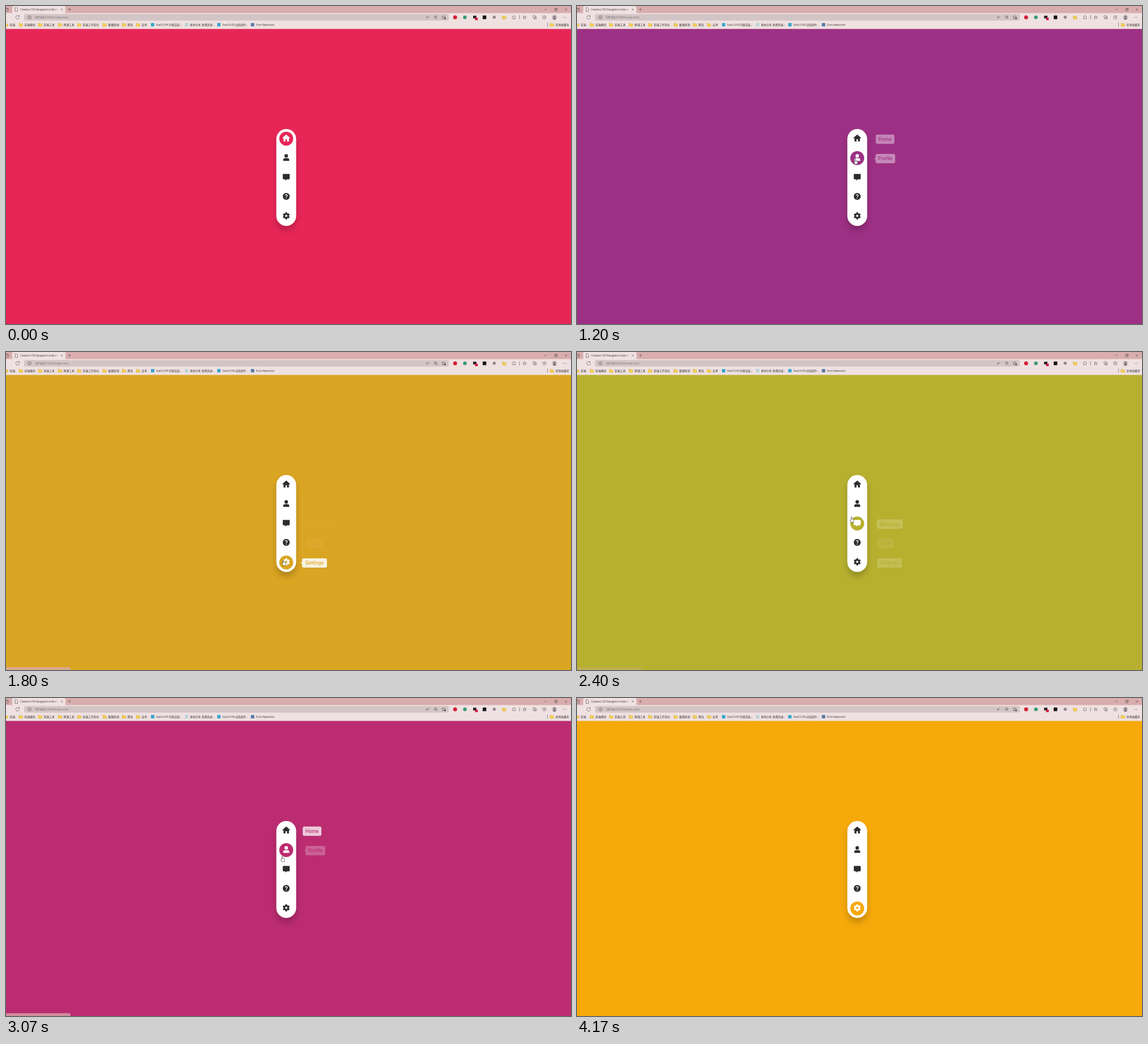
Animation, 998 px wide and 561 px high, one loop 4930 ms. Source, as an HTML page:

```html
<!DOCTYPE html>
<html lang="en">
<head>
<meta charset="utf-8">
<title>Navigation indicator</title>
<style>
  html, body { margin: 0; width: 100%; height: 100%; overflow: hidden; }
  svg { display: block; width: 100vw; height: 100vh; }
  .ui { font-family: "Open Sans", "Noto Sans CJK SC", "Noto Sans CJK", sans-serif; fill: #3b3435; }
  .tip { font: 500 8.3px Inter, sans-serif; text-anchor: middle; }
  .line { fill: none; stroke: #4b4344; stroke-width: .6; }
</style>
</head>
<body>
<svg id="stage" viewBox="0 0 998 561" preserveAspectRatio="none">
  <defs>
    <filter id="soft" x="-100%" y="-30%" width="300%" height="160%"><feGaussianBlur stdDeviation="6"/></filter>
    <linearGradient id="tabFade"><stop offset="0" stop-color="#efe1e1" stop-opacity="0"/><stop offset="1" stop-color="#efe1e1"/></linearGradient>
  </defs>
  <rect width="998" height="561" fill="currentColor"/>
  <g id="browser" class="ui"></g>
  <rect x="478" y="225" width="34" height="171" rx="17" opacity=".2" filter="url(#soft)"/>
  <rect x="477.5" y="217" width="35" height="171" rx="17.5" fill="#fff"/>
  <circle id="dot" cx="495" r="12.3" fill="currentColor"/>
  <g id="icons"></g>
  <g id="tips"></g>
  <path id="status" d="M0 556H112Q114 556 114 558V561H0Z" fill="#d9adad"/>
  <g id="cursor" fill="#fff" stroke="#222" stroke-width=".6" stroke-linejoin="round">
    <path id="arrow" d="M0 0V9L2.2 7L3.7 10.2L5 9.6L3.6 6.5H6.4Z"/>
    <path id="hand" d="M-1.9 1V-4.2Q-1.2-5.4-.5-4.2V-1.2L2.5-.6Q3.3-.3 3.2 .6L2.6 4.8H-1.7L-3.7 1.6Q-3.4 .3-1.9 1Z"/>
  </g>
</svg>
<script>
const LOOP = 4930, FADE = 500;
const byId = id => document.getElementById(id);
const lerp = (a, b, k) => a + (b - a) * k;
const rowY = i => 234 + i * 34.3;

const gear = () => {
  let teeth = "";
  for (let a = 0; a < 360; a += 60)
    teeth += `<rect x="-1.7" y="-6.2" width="3.4" height="5" rx=".7" transform="rotate(${a})"/>`;
  return `${teeth}<circle r="4.6"/><circle r="1.9" class="hole"/>`;
};

const items = [
  { name: "Home", width: 33, color: [231, 38, 87], icon:
    '<path d="M0-6.3L6.7-.4L5.8 .7L4.8 0V5.3Q4.8 6 4.1 6H1.3V2H-1.3V6H-4.1Q-4.8 6-4.8 5.3V0L-5.8 .7L-6.7-.4Z"/>' },
  { name: "Profile", width: 34.5, color: [60, 60, 190], icon:
    '<circle cy="-2.9" r="3.1"/><path d="M-5.3 6V4.2Q-5.3 1.2-2.3 1.2H2.3Q5.3 1.2 5.3 4.2V6Z"/>' },
  { name: "Message", width: 45.5, color: [5, 196, 107], icon:
    '<path d="M-5-5.4H5Q6.1-5.4 6.1-4.3V3Q6.1 4.1 5 4.1H1.2L-1.6 6.4V4.1H-5Q-6.1 4.1-6.1 3V-4.3Q-6.1-5.4-5-5.4Z"/>' },
  { name: "Help", width: 28, color: [15, 188, 249], icon:
    '<circle r="6.1"/><path class="mark" d="M-1.8-1.5Q-1.7-3.2 0-3.2Q1.8-3.2 1.8-1.6Q1.8-.6 .6 0Q0 .4 0 1.2" fill="none" stroke-width="1.2"/><circle class="hole" cy="3" r=".8"/>' },
  { name: "Settings", width: 44, color: [246, 169, 11], icon: gear() }
];

// [time, hovered row]; -1 means the pointer left the bar
const hovers = [
  [855, 0], [1070, 1], [1270, 2], [1410, 3], [1520, 4], [2140, -1],
  [2275, 3], [2325, 2], [2430, 1], [2495, 0], [2980, 1],
  [3112, 2], [3228, 3], [3402, 4], [3640, -1]
];

const pointerPath = [
  [250, 640, 490], [570, 562, 365], [870, 509, 244], [950, 497, 236], [1070, 494, 252],
  [1270, 492, 286], [1410, 491, 322], [1430, 491, 338], [1520, 491, 355], [1650, 492, 372],
  [2050, 490, 372], [2140, 476, 374], [2230, 472, 335], [2275, 480, 328], [2325, 483, 319],
  [2400, 486, 296], [2430, 487, 284], [2495, 488, 251], [2600, 489, 237], [2850, 489, 240],
  [2980, 488, 252], [3070, 489, 284], [3112, 489, 288], [3228, 490, 320], [3402, 492, 354],
  [3470, 493, 366], [3570, 494, 374], [3640, 476, 386], [4000, 430, 575]
];

// CSS "ease": cubic-bezier(.25, .1, .25, 1)
function ease(x) {
  if (x <= 0) return 0;
  if (x >= 1) return 1;
  let lo = 0, hi = 1, u;
  for (let n = 0; n < 18; n++) {
    u = (lo + hi) / 2;
    if (.75 * u * (1 - u) + u ** 3 < x) lo = u; else hi = u;
  }
  return .3 * u * (1 - u) ** 2 + 3 * u * u * (1 - u) + u ** 3;
}

// Chained transitions, each starting from wherever the last one had got to
function follow(t, start, steps) {
  let from = start, to = start, since = 0;
  for (const [when, target] of steps) {
    if (when > t) break;
    if (target === to) continue;
    from = lerp(from, to, ease((when - since) / FADE));
    to = target;
    since = when;
  }
  return lerp(from, to, ease((t - since) / FADE));
}

function pointerAt(t) {
  const n = pointerPath.findIndex(p => p[0] > t);
  if (n < 1) return null;
  const [t0, x0, y0] = pointerPath[n - 1], [t1, x1, y1] = pointerPath[n];
  const k = (t - t0) / (t1 - t0);
  return [lerp(x0, x1, k), lerp(y0, y1, k)];
}

function drawBrowser() {
  const text = (x, y, s, size = 4.8, more = "") => `<text x="${x}" y="${y}" font-size="${size}" ${more}>${s}</text>`;
  const box = (x, y, w, h, fill, rx = 0) => `<rect x="${x}" y="${y}" width="${w}" height="${h}" rx="${rx}" fill="${fill}"/>`;
  const disc = (x, y, r, fill) => `<circle cx="${x}" cy="${y}" r="${r}" fill="${fill}"/>`;
  const line = d => `<path class="line" d="${d}"/>`;
  const ring = (x, y, r) => `<circle class="line" cx="${x}" cy="${y}" r="${r}"/>`;
  const folder = (x, y) => `<path d="M${x} ${y - 2.6}h2.5l1 1h3v4.5h-6.5z" fill="#f4cf52" stroke="#c79b2b" stroke-width=".4"/>`;
  const folders = [[-3, "前端"], [23, "前端模块"], [57, "前端工具"], [92, "网课工具"], [126, "前端工作岗位"],
    [171, "截图影视"], [205, "爬虫"], [230, "自考"], [961, "其他收藏夹"]];
  const links = [[256, "#3aa7cf", "Vue3.0-04.列表渲染…"], [316, "#b9d3d8", "素材分享_免费高速…"],
    [373, "#3aa7cf", "Vue3.0-06.动态组件…"], [432.5, "#587ca6", "Font Awesome"]];

  byId("browser").innerHTML = [
    box(0, 0, 998, 13, "#d9adad"), box(0, 12.5, 998, 28, "#efe1e1"),
    box(11, 0, 94, 14, "#efe1e1", 2),
    line("M0 4H4V9H0M0 5H4M16 3H19L20.5 4.5V9.5H16Z"),
    text(25, 8, "Creative CSS Navigation Indicator", 4.5),
    box(84, 2, 9, 9, "url(#tabFade)"), box(93, 2, 11, 9, "#efe1e1"),
    line("M97 4.7L100 7.7M100 4.7L97 7.7M109.5 6H114.5M112 3.5V8.5"),
    line("M951 6.2H955M969 5H972.5V8.5H969ZM970 5V4H973.5V7.5H972.5M987 4.2L991 8.2M991 4.2L987 8.2"),
    line("M23 18A3.2 3.2 0 1 0 23.6 20.6M23.4 16.5V18.5H21.4"),
    box(32, 14.3, 750, 11.4, "#d3c5c6", 2),
    ring(41.5, 20, 2.9), line("M41.5 19.5V21.6M41.5 18.2V18.7"),
    text(51, 21.8, '127.0.0.1<tspan fill="#7b6f70">:5500/index.html</tspan>', 4.9),
    text(742, 22, "A", 5.6), line("M746.5 17.5Q747.5 18.5 746.5 19.5"),
    ring(758.8, 19.5, 2.2), line("M760.4 21.2L762 22.8M757.7 19.5H760"),
    line("M773 16.7L774 18.8L776.3 19L774.5 20.6L775 22.8L773 21.6L771 22.8L771.5 20.6L769.7 19L772 18.8Z"),
    disc(775.7, 22, 1.4, "#51484a"),
    disc(793.3, 20, 3.5, "#d52238"), disc(810.6, 20, 3.2, "#3c9b75"),
    box(825, 17, 6, 5, "#2d2930", 1), box(828.5, 20.5, 4.8, 4.5, "#d5143c", .8),
    box(842, 16.8, 6.4, 6.4, "#17171a", .7), disc(862.4, 19.8, 2.8, "#97888f"),
    folder(876.6, 20.1),
    line("M895 18H896.2Q897.2 15.8 898.2 18H899.5V22.5H895V21Q893.5 20.2 895 19.3Z"),
    line("M916 17L917 19L919 19.1L917.5 20.5L918 22.6L916 21.5L914 22.6L914.5 20.5L913 19.1L915 19Z"),
    line("M931 17.2H935V21.2H931ZM932.5 21.2V22.8H936.6V18.7H935M907 16.5V23.5"),
    ring(950.8, 20, 2.9), line("M950.8 18.2V20.2H952.3"),
    disc(968.8, 20, 4.2, "#b9aeb0"), disc(968.8, 18.7, 1.5, "#756b70"),
    '<path d="M966 23Q968.8 18.6 971.6 23Q968.8 25.4 966 23Z" fill="#756b70"/>',
    ...[984.7, 987, 989.3].map(x => disc(x, 20, .55, "#443c3d")),
    ...folders.map(([x, s]) => folder(x, 33) + text(x + 9.6, 34.9, s)),
    ...links.map(([x, fill, s]) => box(x, 30, 6, 6, fill, .8) + text(x + 9, 34.9, s, 4.7)),
    line("M956.5 29.5V36.5")
  ].join("");
}

drawBrowser();
byId("icons").innerHTML = items.map((item, i) =>
  `<g transform="translate(495 ${rowY(i) - 1})">${item.icon}</g>`).join("");
byId("tips").innerHTML = items.map(({ name, width }) => `<g class="tip">
  <rect x=".4" y="-7.2" width="${width}" height="16.4" rx="3" opacity=".1"/>
  <path d="M.5-2.6L-2.2 0L.5 2.6Z" fill="#fff"/>
  <rect y="-8.3" width="${width}" height="16.6" rx="3" fill="#fff"/>
  <text x="${width / 2}" y="2.9" fill="currentColor">${name}</text></g>`).join("");

const stage = byId("stage");
const icons = [...byId("icons").children];
const tips = [...byId("tips").children];
const picks = hovers.filter(h => h[1] >= 0);
const tipSteps = items.map((_, i) => hovers.map(([when, row]) => [when, row === i ? 1 : 0]));
const colorSteps = [0, 1, 2].map(c => picks.map(([when, row]) => [when, items[row].color[c]]));
const statusSteps = [[1560, 1], [2180, 0], [2850, 1], [3680, 0]];

function render(t) {
  const past = hovers.filter(h => h[0] <= t);
  const hovered = past.length ? past[past.length - 1][1] : -1;
  const chosen = past.filter(h => h[1] >= 0);
  const active = chosen.length ? chosen[chosen.length - 1][1] : 0;
  const rgb = colorSteps.map((steps, c) => Math.round(follow(t, items[0].color[c], steps)));
  stage.style.color = `rgb(${rgb})`;
  byId("dot").setAttribute("cy", rowY(active));

  icons.forEach((icon, i) => {
    const on = i === active, inner = on ? "currentColor" : "#fff";
    icon.setAttribute("fill", on ? "#fff" : "#2d2d30");
    icon.querySelectorAll(".hole").forEach(el => el.setAttribute("fill", inner));
    icon.querySelectorAll(".mark").forEach(el => el.setAttribute("stroke", inner));
  });

  tips.forEach((tip, i) => {
    const shown = follow(t, 0, tipSteps[i]);
    tip.setAttribute("opacity", shown);
    tip.setAttribute("transform", `translate(${532 - 10.5 * shown} ${rowY(i) + 1})`);
    tip.children[1].setAttribute("opacity", i === hovered ? 1 : 0);
  });

  byId("status").setAttribute("opacity", follow(t, 0, statusSteps));
  const at = pointerAt(t);
  byId("cursor").setAttribute("display", at ? "inline" : "none");
  if (at) byId("cursor").setAttribute("transform", `translate(${at})`);
  byId("hand").setAttribute("display", hovered >= 0 ? "inline" : "none");
  byId("arrow").setAttribute("display", hovered >= 0 ? "none" : "inline");
}

const begin = performance.now();
function tick() {
  render((performance.now() - begin) % LOOP);
  requestAnimationFrame(tick);
}
tick();
</script>
</body>
</html>
```
